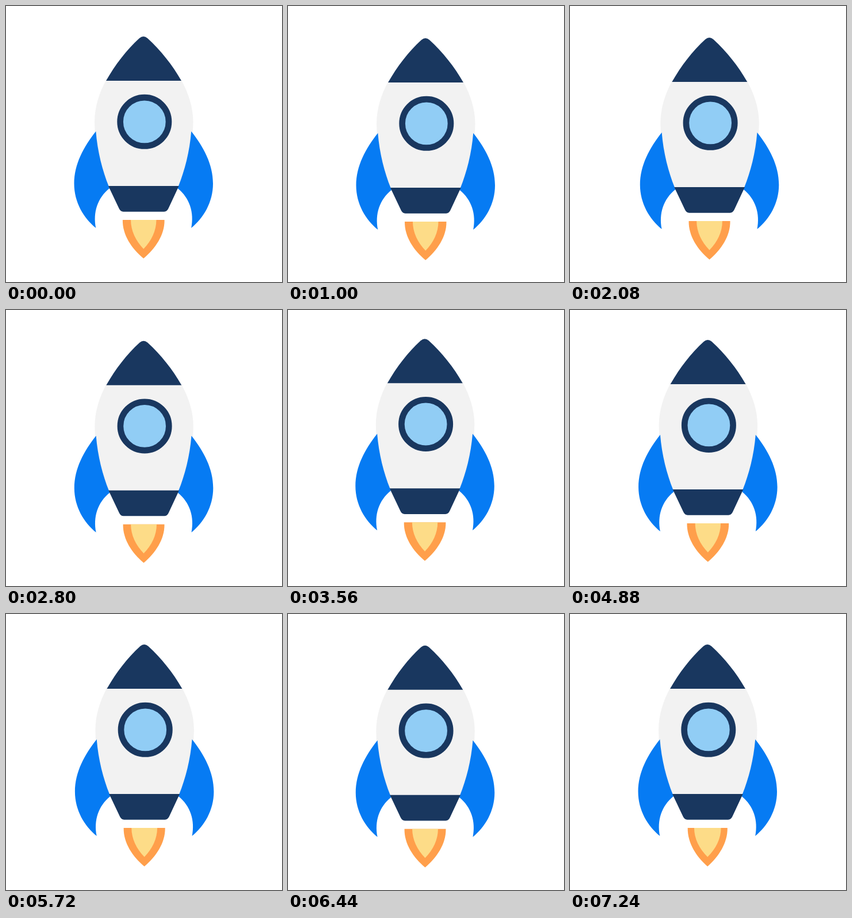
Animation, 480 px wide and 480 px high, one loop 7280 ms. Source, as an HTML page:

```html
<!DOCTYPE html>
<html lang="en">
<head>
<meta charset="utf-8">
<title>Rocket</title>
<style>
  html, body { margin: 0; width: 100%; height: 100%; overflow: hidden; background: #fff; }
  svg { display: block; width: 100%; height: 100%; }
  .navy { fill: #19375f; }
  .fin { fill: #067bf3; }
</style>
</head>
<body>
<svg viewBox="0 0 480 480">
  <defs>
    <path id="fin" class="fin" d="M156.300 218C135 245 118.500 275 118.500 309C118.500 341 135 369 156.300 386C151 359 159 334 180 317L178.500 313C168 287 159 253 156.300 218Z"/>
  </defs>
  <g id="rocket">
    <path fill="#f2f2f2" d="M174 129H305C317 151 325.500 176 325.500 202C325.500 240 315 276 300.500 314H178C164 276 154 240 154 202C154 176 162 151 174 129Z"/>
    <use href="#fin"/>
    <use href="#fin" transform="matrix(-1 0 0 1 478.500 0)"/>
    <path class="navy" d="M174 130C190 102 209 77 232 56Q239 50 246 56C269 77 289 102 305 130Z"/>
    <path class="navy" d="M178 313H300.700L282.500 352Q280 357.700 275 357.700H204Q199 357.700 196.500 352Z"/>
    <circle cx="240.800" cy="201.300" r="42.200" fill="#91cdf5" stroke="#19375f" stroke-width="10.600"/>
    <path id="outer" fill="#ff9f4b" d="M203 372H275.500C276 398 259.500 422 239.200 439C218.500 422 202.500 398 203 372Z"/>
    <path id="inner" fill="#fddc88" d="M217 372H261.500C261.500 391 253 408 239.200 422.500C225.500 408 217 391 217 372Z"/>
  </g>
</svg>
<script>
const LOOP = 7280, STEP = 40, TURN = 2 * Math.PI;
const WOBBLE = 2.4, WOBBLE_MS = 400, FLICKERS = 88;

// The slow drift: time, x, y
const drift = [
  [0, 0, 0], [1000, 0, 3], [2080, 3.3, 2], [3560, -1.2, -2.8],
  [4880, 0.6, -0.9], [5720, 1.4, 0], [7240, 0, 0]
];

const byId = id => document.getElementById(id);
const rocket = byId("rocket"), outer = byId("outer"), inner = byId("inner");

// Drift plus a shake that makes whole turns between two drift points
function position(t) {
  const i = drift.findIndex(p => p[0] >= t);
  if (i < 1) return [0, 0];
  const [t0, x0, y0] = drift[i - 1], [t1, x1, y1] = drift[i];
  const u = (t - t0) / (t1 - t0);
  const turns = Math.round((t1 - t0) / WOBBLE_MS);
  const shake = n => WOBBLE * Math.sin(TURN * n * u);
  return [x0 + (x1 - x0) * u + shake(turns), y0 + (y1 - y0) * u + shake(turns + 1)];
}

function widen(el, scale) {
  el.setAttribute("transform", `translate(239.2 0) scale(${scale} 1) translate(-239.2 0)`);
}

function draw() {
  const t = Math.floor(performance.now() % LOOP / STEP) * STEP;
  const [x, y] = position(t);
  const flame = 0.978 + 0.025 * Math.cos(TURN * FLICKERS * t / LOOP);
  rocket.setAttribute("transform", `translate(${x} ${y})`);
  widen(outer, flame);
  widen(inner, 2 - flame);
  requestAnimationFrame(draw);
}
draw();
</script>
</body>
</html>
```
